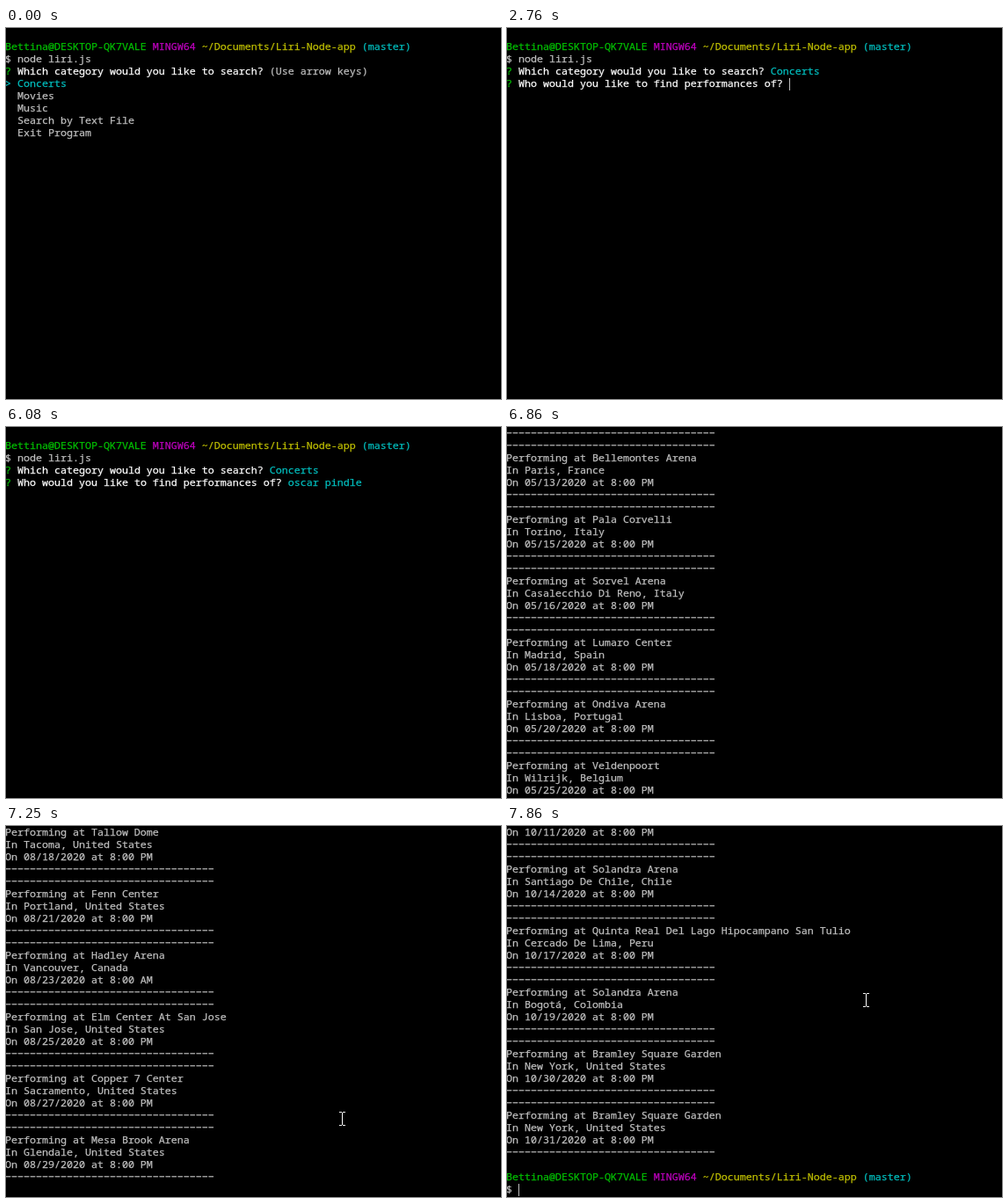
An HTML page for the animation above (8 s loop, 563 px wide and 422 px high).

```html
<!DOCTYPE html>
<html lang="en">
<head>
<meta charset="utf-8">
<title>Terminal concert search</title>
<style>
html, body { margin: 0; width: 100%; height: 100%; overflow: hidden; background: #000; }
#screen, #caret, #pointer { position: absolute; }
#screen {
  left: -1px; top: 0; margin: 0; color: #bfbfbf;
  font: 11.667px/14px "Noto Sans Mono", monospace; font-variant-ligatures: none;
  -webkit-text-stroke: .25px;
}
#caret { width: 1px; height: 14px; background: #bfbfbf; }
#pointer { left: 0; top: 0; width: 100%; height: 100%; }
#beam { stroke: #fff; fill: none; }
#busy { stroke: #2f9bd8; stroke-width: 4; fill: none; }
.g { color: #00bf00; } .m { color: #bf00bf; } .y { color: #bfbf00; }
.c { color: #00bfbf; } .w { color: #fff; }
</style>
</head>
<body>
<pre id="screen"></pre>
<div id="caret"></div>
<svg id="pointer">
  <path id="beam" d="M0 .5h3M4 .5h3M3.5 1v14M0 15.5h3M4 15.5h3"/>
  <circle id="busy" cx="436" cy="362" r="9.5"/>
</svg>
<script>
const LOOP = 8000, ROWS = 30, COL = 7, ROW = 14, BLINK = 545;
const ENTER = 1670, SUBMIT = 6080, OUTPUT = 6720;
const artist = 'oscar pindle';
const keys = [3140, 3290, 3450, 4460, 4610, 4920, 5070, 5190, 5300, 5620, 5770, 5850];
// Lines printed after each refresh of the scrolling output
const printed = [37, 58, 79, 108, 137, 167, 196, 225, 245, 265, 285, 298];

const $ = id => document.getElementById(id);
const ink = (color, text) => `<span class="${color}">${text}</span>`;
const ask = text => ink('g', '?') + ' ' + ink('w', text) + ' ';
const prompt = [ink('g', 'Bettina@DESKTOP-QK7VALE'), ink('m', 'MINGW64'),
  ink('y', '~/Documents/Liri-Node-app'), ink('c', '(master)')].join(' ');
const search = ask('Which category would you like to search?');
const who = ask('Who would you like to find performances of?');
const whoCols = 46;

const show = text => {
  const [date, venue, city, half = 'PM'] = text.split('|');
  return { date, venue, city, half };
};
const names = ['Larkholm', 'Verano', 'Dunmere', 'Castell', 'Oakridge', 'Marlow'];
const tour = (month, day, gap, cities, country) => cities.split(',').map((city, i) => {
  const d = new Date(2020, month - 1, day + gap * i);
  const date = [d.getMonth() + 1, d.getDate()].map(n => String(n).padStart(2, '0')).join('/');
  const land = country || city.split(':')[1];
  return { date, venue: names[i % names.length] + ' Arena', city: `${city.split(':')[0]}, ${land}`, half: 'PM' };
});

const shows = [
  ...tour(4, 15, 3, 'Birmingham,Sheffield,London,London,Glasgow,Manchester,Leeds,Cardiff,Newcastle', 'United Kingdom'),
  ...[
    '05/13|Bellemontes Arena|Paris, France',
    '05/15|Pala Corvelli|Torino, Italy',
    '05/16|Sorvel Arena|Casalecchio Di Reno, Italy',
    '05/18|Lumaro Center|Madrid, Spain',
    '05/20|Ondiva Arena|Lisboa, Portugal',
    '05/25|Veldenpoort|Wilrijk, Belgium'
  ].map(show),
  ...tour(5, 27, 2, 'Amsterdam:Netherlands,Berlin:Germany,Hamburg:Germany,Stockholm:Sweden,Oslo:Norway,Prague:Czechia,Vienna:Austria'),
  ...tour(6, 26, 3, 'Philadelphia,Boston,Buffalo,Washington,Atlanta,Tampa,Sunrise,Nashville,Detroit,Columbus,Chicago,Saint Paul,Saint Louis,Dallas,Houston,Denver', 'United States'),
  ...[
    '08/18|Tallow Dome|Tacoma, United States',
    '08/21|Fenn Center|Portland, United States',
    '08/23|Hadley Arena|Vancouver, Canada|AM',
    '08/25|Elm Center At San Jose|San Jose, United States',
    '08/27|Copper 7 Center|Sacramento, United States',
    '08/29|Mesa Brook Arena|Glendale, United States'
  ].map(show),
  ...tour(8, 31, 5, 'San Diego:United States,Inglewood:United States,Inglewood:United States,Las Vegas:United States,Monterrey:Mexico,Mexico City:Mexico,Rio De Janeiro:Brazil,Curitiba:Brazil'),
  ...[
    '10/11|Larkholm Arena|Buenos Aires, Argentina',
    '10/14|Solandra Arena|Santiago De Chile, Chile',
    '10/17|Quinta Real Del Lago Hipocampano San Tulio|Cercado De Lima, Peru',
    '10/19|Solandra Arena|Bogotá, Colombia',
    '10/30|Bramley Square Garden|New York, United States',
    '10/31|Bramley Square Garden|New York, United States'
  ].map(show)
];

const rule = '−'.repeat(34);
const start = ['', prompt, '$ node liri.js'];
const menu = [...start, search + '(Use arrow keys)', ink('c', '&gt; Concerts'),
  ...['Movies', 'Music', 'Search by Text File', 'Exit Program'].map(item => '  ' + item)];
const chosen = [...start, search + ink('c', 'Concerts')];
const log = [...chosen, who + ink('c', artist),
  ...shows.flatMap(s => [rule, 'Performing at ' + s.venue, 'In ' + s.city,
    `On ${s.date}/2020 at 8:00 ${s.half}`, rule]),
  '', prompt, '$ '];

const tickAt = t => t < OUTPUT ? -1 : Math.max(0, Math.floor((t - 6705) / 76.5));

function linesAt(t, tick, typed) {
  if (t < ENTER) return menu;
  if (t < SUBMIT) return [...chosen, who + artist.slice(0, typed)];
  if (tick < 0) return log.slice(0, 5);
  const lines = log.slice(0, printed[Math.min(tick, printed.length - 1)]);
  if (lines.length % 5 === 0) lines.push(''); // empty line after a complete entry
  return lines.slice(-ROWS);
}

function caretAt(t, tick, typed) {
  if (tick >= printed.length - 1) return [2, ROWS - 1];
  if (t < ENTER || t >= SUBMIT) return null;
  const last = typed ? keys[typed - 1] : ENTER;
  return Math.floor((t - last) / BLINK) % 2 ? null : [whoCols + typed, 4];
}

function beamAt(t, tick) {
  if (t >= 280 && t < 340) return [445, 367];
  if (t >= 340 && t < ENTER) return t >= 580 && t < 810 ? null : [435, 355];
  if (tick < 7) return null;
  const p = Math.min(1, (tick - 7) / 8), e = p * p * (3 - 2 * p);
  return [Math.round(379 + 26 * e), Math.round(325 - 135 * e)];
}

const toggle = (node, on) => { node.style.visibility = on ? 'visible' : 'hidden'; };
let shown;

function draw() {
  const t = performance.now() % LOOP, tick = tickAt(t);
  const typed = keys.filter(k => k <= t).length;
  const html = linesAt(t, tick, typed).join('\n');
  if (html !== shown) $('screen').innerHTML = shown = html;

  const caret = caretAt(t, tick, typed);
  toggle($('caret'), caret);
  if (caret) {
    $('caret').style.left = caret[0] * COL - 1 + 'px';
    $('caret').style.top = caret[1] * ROW + 1 + 'px';
  }
  const beam = beamAt(t, tick);
  toggle($('beam'), beam);
  if (beam) $('beam').setAttribute('transform', `translate(${beam})`);
  toggle($('busy'), t >= 580 && t < 810);
  requestAnimationFrame(draw);
}
draw();
</script>
</body>
</html>
```
